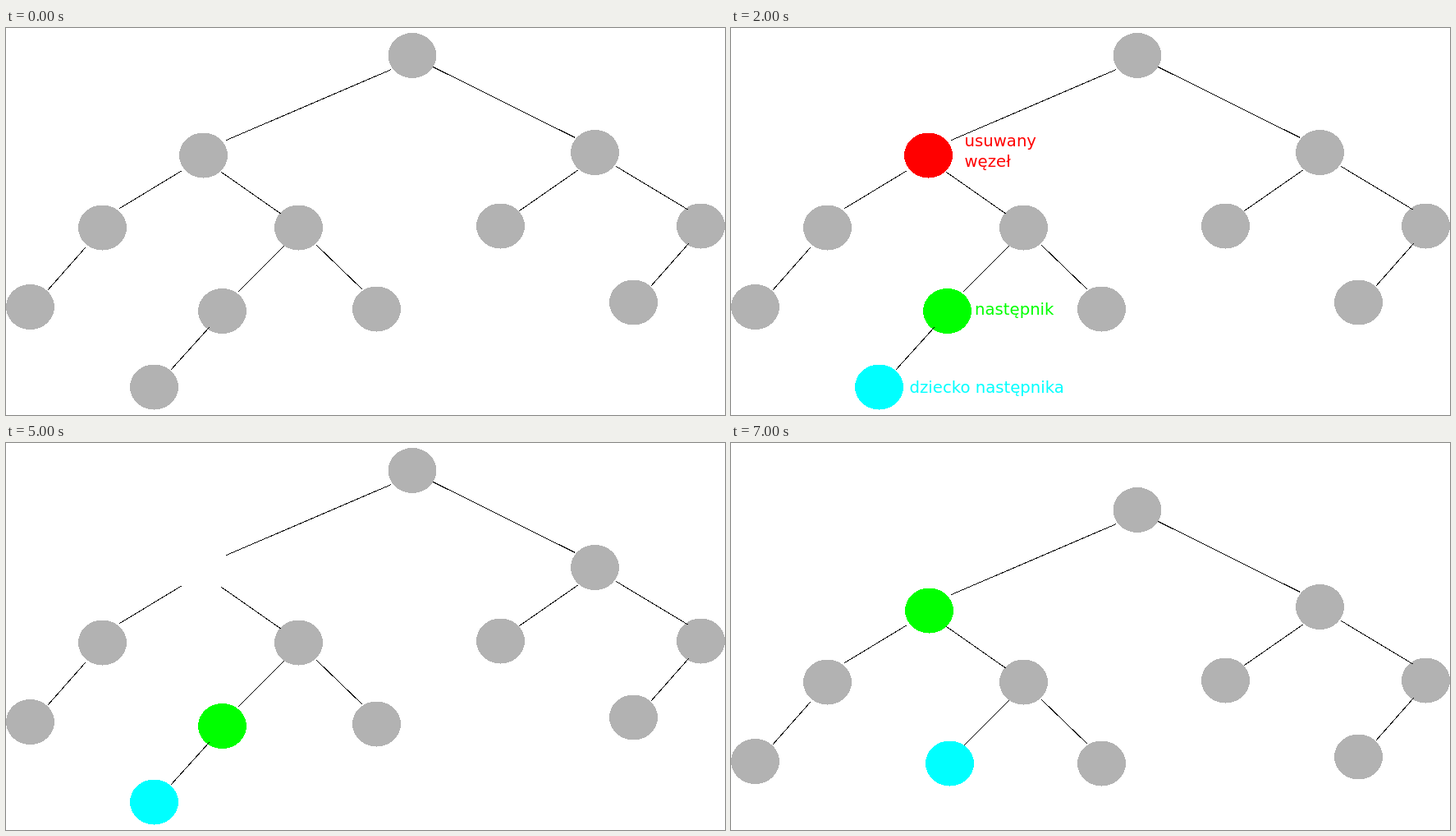
Write an HTML page that moves like this. It is 876 by 471 pixels and loops after 8000 ms.

```html
<!DOCTYPE html>
<html lang="pl">
<head>
<meta charset="utf-8">
<title>Usuwanie węzła z drzewa BST</title>
<style>
  html, body { margin: 0; width: 100%; height: 100%; overflow: hidden; background: #fff; }
  svg { display: block; width: 876px; height: 471px; shape-rendering: crispEdges; }
  ellipse { rx: 29.5px; ry: 27.5px; fill: #b2b2b2; }
  text { font: 19.7px "DejaVu Sans", sans-serif; }
  .edges { stroke: #000; stroke-width: 1; fill: none; }
  .arrow { stroke-width: 4; fill: none; }
  .red { fill: #f00; }
  .green { fill: #0f0; }
  .cyan { fill: #0ff; }

  /* Eight one-second steps: every state holds until the next key. */
  .tree, .removed, .successor, .child, .link, .labels, .arrow {
    animation: 8s step-end infinite;
  }
  .tree { animation-name: settle; }
  .removed { animation-name: removed; }
  .successor { animation-name: successor; }
  .child { animation-name: child; }
  .link { animation-name: link; }
  .labels { animation-name: labels; }
  .up { stroke: #0f0; animation-name: up; }
  .side { stroke: #0ff; animation-name: side; }

  @keyframes settle {
    0% { transform: none; }
    87.5%, 100% { transform: translateY(48px); }
  }
  @keyframes removed {
    0% { fill: #b2b2b2; transform: none; }
    12.5% { fill: #f00; transform: none; }
    62.5% { fill: transparent; transform: none; }
    75%, 100% { fill: #0f0; transform: translate(1px, 1px); }
  }
  @keyframes successor {
    0% { fill: #b2b2b2; }
    12.5% { fill: #0f0; }
    75%, 100% { fill: transparent; }
  }
  @keyframes child {
    0% { fill: #b2b2b2; transform: none; }
    12.5% { fill: #0ff; transform: none; }
    87.5%, 100% { fill: #0ff; transform: translate(86px, -95px); }
  }
  @keyframes link {
    0% { visibility: visible; }
    87.5%, 100% { visibility: hidden; }
  }
  @keyframes labels {
    0% { visibility: hidden; }
    25% { visibility: visible; }
    62.5%, 100% { visibility: hidden; }
  }
  @keyframes up {
    0% { visibility: hidden; }
    37.5% { visibility: visible; }
    62.5%, 100% { visibility: hidden; }
  }
  @keyframes side {
    0% { visibility: hidden; }
    50% { visibility: visible; }
    62.5%, 100% { visibility: hidden; }
  }
</style>
</head>
<body>
<svg viewBox="0 0 876 471">
  <g class="tree">
    <ellipse cx="495" cy="33.5"/>
    <ellipse cx="717.5" cy="151.5"/>
    <ellipse cx="117.5" cy="243"/>
    <ellipse cx="356.5" cy="243"/>
    <ellipse cx="602.5" cy="241"/>
    <ellipse cx="846.5" cy="241"/>
    <ellipse cx="29.5" cy="339.5"/>
    <ellipse cx="451.5" cy="342"/>
    <ellipse cx="764.5" cy="334"/>
    <ellipse class="removed" cx="240.5" cy="155"/>
    <ellipse class="successor" cx="263.5" cy="344.5"/>
    <g class="edges" transform="translate(.5 .5)">
      <path d="M469 50 268 136M520 47 693 133M214 173 138 219M262 175 335 226
               M697 172 625 222M743 168 831 221M96 267 50 319M338 265 282 321
               M378 264 434 318M831 262 785 314"/>
    </g>
    <ellipse class="child" cx="180.5" cy="437"/>
    <g class="edges" transform="translate(.5 .5)">
      <path class="link" d="M247 364 200 416"/>
    </g>
  </g>
  <g class="labels">
    <text class="red" x="284.5" y="144">usuwany</text>
    <text class="red" x="284.5" y="169">węzeł</text>
    <text class="green" x="297" y="349">następnik</text>
    <text class="cyan" x="217.5" y="444">dziecko następnika</text>
  </g>
  <path class="arrow up" d="M256 291 249 219M230 255 249 219 282 249"/>
  <path class="arrow side" d="M160 402 213 355M174 358 213 355 209 398"/>
</svg>
</body>
</html>
```
